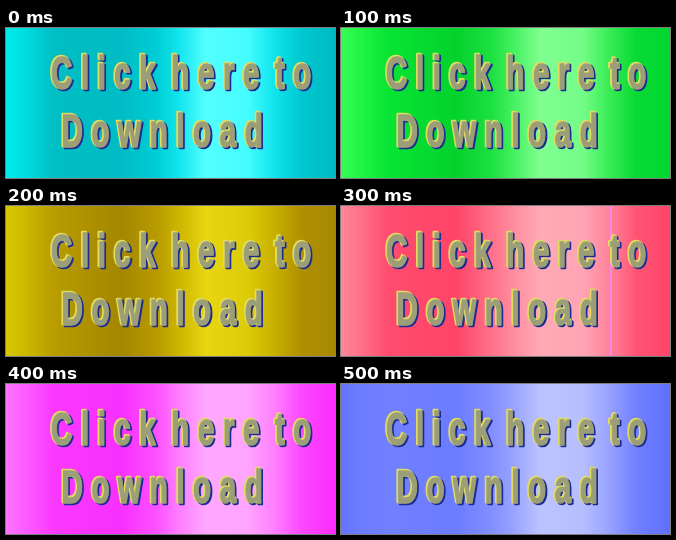
Animation, 329 px wide and 150 px high, one loop 0.6 s. Source, as an HTML page:

```html
<!DOCTYPE html>
<html lang="en">
<head>
<meta charset="utf-8">
<title>Download button</title>
<style>
html, body { margin: 0; width: 100%; height: 100%; overflow: hidden; }
#stage { position: relative; width: 329px; height: 150px; overflow: hidden; }
.tint, svg { position: absolute; left: 0; top: 0; width: 329px; height: 150px; }
.tint { opacity: 0; }
svg { filter: blur(.6px); }
text {
  font: bold 46px "Liberation Sans", Arial, sans-serif;
  letter-spacing: 12.9px;
  word-spacing: -15px;
  stroke-width: 2.6px;
  stroke-linejoin: round;
}
.shade { fill: #1c2c90; stroke: #1c2c90; }
.shine { fill: #e0dc60; stroke: #e0dc60; }
.face { fill: #9c9e78; stroke: #9c9e78; stroke-width: 1.4px; }
</style>
</head>
<body>
<div id="stage"></div>
<script>
const STEP = 100;
// All tints share one sheen profile: positions across the button.
const xs = [0, 20, 48, 115, 150, 172, 200, 242, 268, 295, 329];
const tints = [
  '#00ecec #00dce0 #00bec4 #00bcc4 #00ccd4 #10e4ec #54ffff #44fcff #10e4ec #00c8d0 #00bac2',
  '#38fc58 #20f444 #08e434 #04d22c #1ce040 #44f060 #80ff90 #74fc88 #38ec54 #08da34 #00d62e',
  '#d8c800 #ccb800 #b89c00 #a48600 #b89a00 #ccb400 #e8d610 #dccb08 #c8b000 #b09000 #a88800',
  '#ff8898 #ff7088 #ff4c6e #ff4468 #ff7088 #ff8c9e #ffaab6 #ffa4b4 #ff849c #ff5474 #ff4468',
  '#ff74ff #fc5cff #fa38ff #f830ff #fc50ff #ff7cff #ffa8ff #ffa4ff #ff80ff #fc48ff #fa2cff',
  '#6474ff #6c7cff #7080ff #6c7cff #828eff #98a2ff #bcc4ff #b6beff #98a2ff #7080ff #6070ff'
].map(t => t.split(' '));

const stage = document.getElementById('stage');
const count = tints.length;
const streak = 'linear-gradient(#ff84e8, #ff84e8) 269px 0 / 2px 100% no-repeat, ';

tints.forEach((tint, i) => {
  const el = document.createElement('div');
  el.className = 'tint';
  el.style.background = (i === 3 ? streak : '') +
    `linear-gradient(90deg, ${tint.map((c, k) => `${c} ${xs[k]}px`).join(', ')})`;
  stage.append(el);
  const keys = Array.from({ length: count }, (_, k) => ({
    opacity: k === i ? 1 : 0, offset: k / count, easing: 'step-end'
  }));
  keys.push({ opacity: i === 0 ? 1 : 0, offset: 1 });
  const anim = el.animate(keys, { duration: STEP * count, iterations: Infinity });
  anim.startTime = 0;
});

// Condensed bevelled lettering: shadow, highlight, then face.
const lines = [['Click here to', 44.5, 60.5], ['Download', 55, 118.5]];
const layers = [['shade', 1.8, 1.7], ['shine', -0.8, -0.6], ['face', 0.5, 0.5]];
const label = layers.map(([name, dx, dy]) => lines.map(([str, x, y]) =>
  `<text class="${name}" transform="translate(${x + dx} ${y + dy}) scale(.65 1)">${str}</text>`
).join('')).join('');
stage.insertAdjacentHTML('beforeend', `<svg viewBox="0 0 329 150">${label}</svg>`);
</script>
</body>
</html>
```
